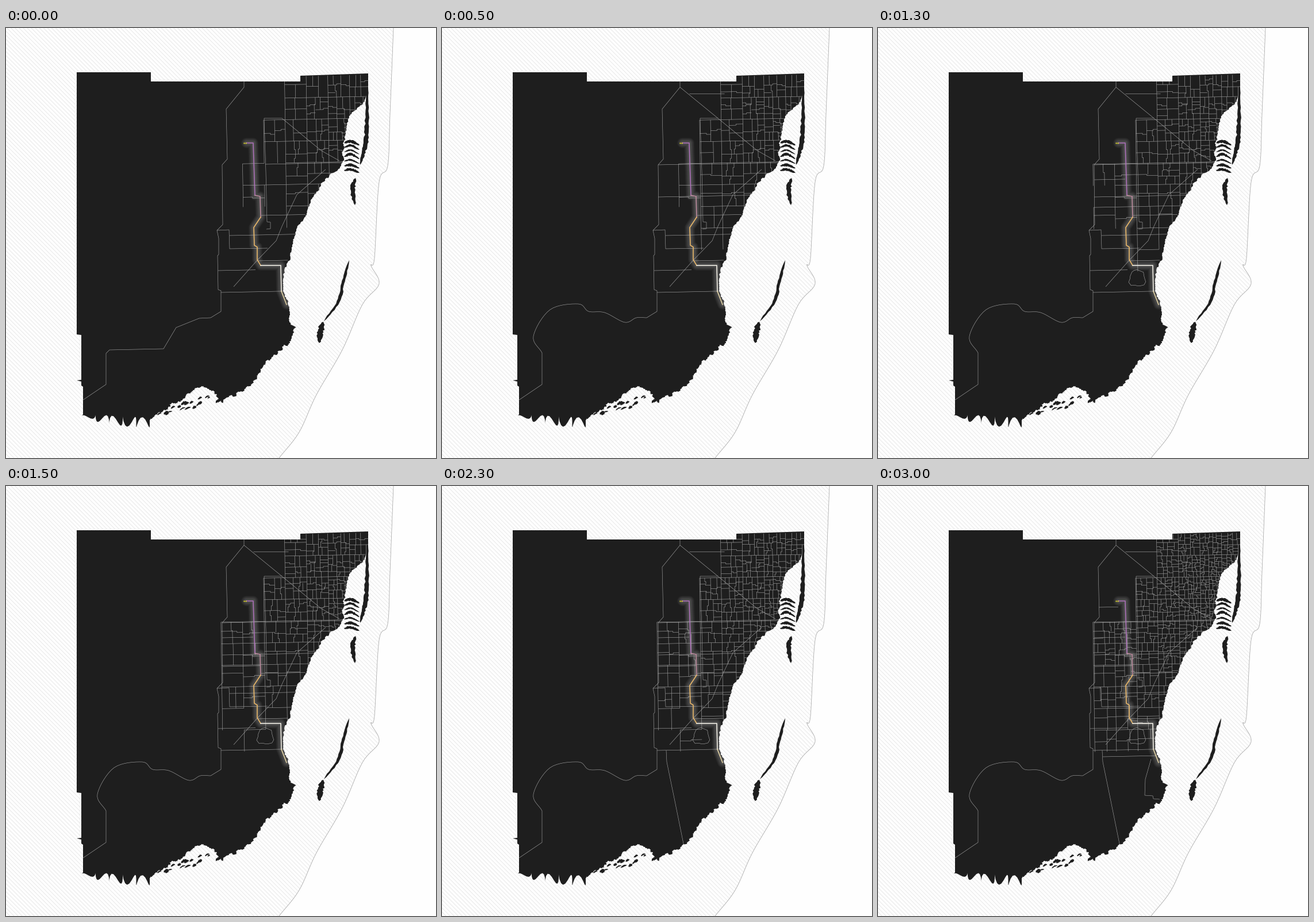
Recreate the animation shown at these times as a matplotlib script. Size 748x748 px, loop 3.5 s.

```python
import math
import random

import matplotlib.pyplot as plt
import numpy as np
from matplotlib.animation import FuncAnimation
from matplotlib.collections import LineCollection
from matplotlib.patches import Polygon

SIZE = 748
STEPS = 7
LAND, PAPER = "#1e1e1e", "#fefefe"
PX = 0.72  # points per pixel at 100 dpi
TILE = 37.6
CENTRE = (590, 170)  # the densest part of the network

rng = random.Random(12)

fig = plt.figure(figsize=(SIZE / 100, SIZE / 100), dpi=100, facecolor=PAPER)
ax = fig.add_axes([0, 0, 1, 1])
ax.set_xlim(0, SIZE)
ax.set_ylim(SIZE, 0)
ax.axis("off")


def pts(*xy):
    return np.array(xy, float).reshape(-1, 2)


def smooth(points, per=8):
    """Catmull-Rom curve through the points."""
    p = np.vstack([2 * points[0] - points[1], points, 2 * points[-1] - points[-2]])
    t = np.linspace(0, 1, per, endpoint=False)[:, None]
    out = []
    for a, b, c, d in zip(p, p[1:], p[2:], p[3:]):
        out.append(0.5 * (2 * b + (c - a) * t + (2 * a - 5 * b + 4 * c - d) * t**2
                          + (3 * b - a - 3 * c + d) * t**3))
    return np.vstack(out + [points[-1:]])


def rough(points, amp, depth=3):
    """Midpoint displacement, for ragged shores."""
    line = [tuple(p) for p in points]
    for _ in range(depth):
        out = line[:1]
        for (x0, y0), (x1, y1) in zip(line, line[1:]):
            k = rng.uniform(-amp, amp)
            out += [((x0 + x1) / 2 - k * (y1 - y0), (y0 + y1) / 2 + k * (x1 - x0)),
                    (x1, y1)]
        line = out
    return np.array(line)


def fill(points, color=LAND, z=3):
    return ax.add_patch(Polygon(points, closed=True, fc=color, ec="none", zorder=z))


def island(spine, width):
    """A ragged strip along a spine, pointed at both ends."""
    mid = smooth(spine)
    normal = np.gradient(mid, axis=0)[:, ::-1] * (-1, 1)
    normal /= np.linalg.norm(normal, axis=1)[:, None]
    n = len(mid)
    taper = np.sin(np.linspace(0, math.pi, n)) ** 0.5 * width / 2
    left, right = ([taper[i] * rng.uniform(0.6, 1.2) for i in range(n)] for _ in "lr")
    fill(np.vstack([mid + normal * np.array(left)[:, None],
                    (mid - normal * np.array(right)[:, None])[::-1]]))


# Hatched surroundings and the offshore limit
limit = smooth(pts(674, 0, 668, 150, 664, 240, 649, 268, 641, 400, 635, 413, 649, 445,
                   620, 481, 585, 560, 540, 638, 510, 703, 475, 748))
zone = fill(np.vstack([pts(0, 0), limit, pts(0, SIZE)]), PAPER, 0)
hatch = LineCollection([[(x, 0), (x + SIZE, SIZE)]
                        for x in np.arange(-SIZE, SIZE, 5 * math.sqrt(2))],
                       colors="#e9e9e9", linewidths=PX, zorder=1)
ax.add_collection(hatch)
hatch.set_clip_path(zone)
ax.plot(*limit.T, color="#a8a8a8", lw=0.8 * PX, zorder=2)

# Mainland
north = pts(134, 672, 134, 624, 131, 622, 131, 534, 123, 533, 123, 77, 252, 77,
            252, 93, 512, 93, 512, 83, 630, 79, 630, 112)
east = pts(627, 117, 621, 130, 600, 150, 592, 174, 587, 205, 583, 240, 556, 262, 542, 284,
           530, 300, 521, 328, 506, 348, 497, 385, 485, 425, 482, 452, 493, 490, 493, 512,
           505, 521)
south = pts(505, 521, 487, 553, 452, 583, 440, 601, 424, 623, 382, 643, 376, 652, 356, 630,
            332, 626, 304, 648, 268, 669, 250, 682)
t = np.linspace(0, 1, 60)
mangrove = np.column_stack([250 - 116 * t + 4 * np.sin(31 * t),
                            686 - 12 * t**2 + 9 * np.sin(44 * t) * (1 - t**4)])
mainland = fill(np.vstack([north, rough(smooth(east, 4), 0.25), rough(smooth(south, 4), 0.4),
                           mangrove]))

# Keys, bay islets and the broken southern fringe
island(pts(629, 100, 628, 150, 627, 190, 622, 216, 616, 238), 8)
island(pts(608, 261, 603, 280, 607, 308), 9)
island(pts(597, 404, 587, 440, 578, 476, 553, 510), 6)
island(pts(552, 511, 547, 528, 545, 548), 11)
for y in range(200, 252, 8):
    island(pts(588, y, 600, y - rng.uniform(0, 5), 615, y + 4), rng.uniform(2, 6))
for i in range(26):
    x = rng.uniform(250, 385)
    y = 672 - (x - 250) * 0.25 + rng.uniform(-5, 10)
    reach = rng.uniform(4, 12)
    island(pts(x, y, x + reach / 2, y - reach * 0.4, x + reach, y - reach * 0.5),
           rng.uniform(2, 6))
spit = fill(pts(123, 613, 131, 612, 131, 615))

# Each line of the network has a first and a last step
network = []


def road(first, *xy, last=STEPS - 1):
    network.append((first, last, pts(*xy)))


# Western boundary and main roads
road(0, 414, 93, 414, 103, 383, 141, 385, 228, 376, 238, 377, 342, 367, 352, 370, 366,
     370, 394, 368, 396, 369, 455, 374, 457, 374, 493)
road(0, 367, 352, 388, 351, 389, 384, 455, 383)
road(0, 396, 450, 437, 404, 470, 370, 480, 345, 506, 290, 556, 246)
road(0, 449, 157, 480, 157, 548, 213, 580, 231)
road(0, 449, 157, 452, 250, 454, 337, 460, 338, 460, 349, 453, 350)
road(1, 414, 103, 480, 157)
road(1, 430, 114, 491, 114)
road(4, 390, 460, 391, 480, 405, 548, 421, 627)
road(6, 475, 475, 465, 510, 464, 538, 478, 539, 479, 544, 490, 545)
for first, x0, x1, y in ((0, 389, 503, 361), (0, 369, 434, 422), (0, 374, 482, 460),
                         (0, 437, 490, 405), (0, 451, 582, 237), (0, 444, 521, 326),
                         (1, 376, 451, 238), (1, 376, 540, 294), (2, 376, 430, 264),
                         (3, 377, 442, 314), (5, 384, 418, 211), (6, 391, 485, 471)):
    road(first, x0, y, x1, y - 0.02 * (x1 - x0))

# Southern parkland border, rerouted after the first step
road(0, 374, 493, 356, 504, 336, 505, 296, 521, 274, 558, 180, 560, 174, 566,
     174, 620, 134, 647, last=0)
bend = smooth(pts(356, 504, 338, 504, 318, 512, 283, 495, 255, 493, 237, 480, 188, 490,
                  159, 536, 174, 565))
road(1, 374, 493, *bend.ravel(), 174, 620, 134, 647)

# A closed, stepped loop
angles = np.linspace(0, 2 * math.pi, 17)
loop = [(451 + rng.uniform(11, 17) * math.cos(a), 436 + rng.uniform(11, 17) * math.sin(a))
        for a in angles[:-1]]
road(2, *np.ravel(loop + loop[:1]))


def first_step(x, y, area):
    """Step at which a block of this area is cut; later away from the centre."""
    d = math.dist((x, y), CENTRE)
    start, end = 180 * math.exp(d / 90), 55 * math.exp(d / 130)
    area *= rng.uniform(0.6, 1.5)
    return next((s for s in range(STEPS)
                 if area > start * (end / start) ** (s / (STEPS - 1))), STEPS)


def street(first, *xy):
    """A local line, on the slightly turned street grid."""
    p = pts(*xy)
    dx, dy = (p - (500, 240)).T
    road(first, *(p + np.column_stack([0.015 * dy, -0.02 * dx])).ravel())


def divide(x0, y0, x1, y1, after=0):
    w, h = x1 - x0, y1 - y0
    step = max(after, first_step((x0 + x1) / 2, (y0 + y1) / 2, w * h))
    if step >= STEPS or min(w, h) < 4:
        return
    k, bend_at = rng.uniform(0.36, 0.64), rng.uniform(0.3, 0.7)
    jog = rng.choice([0, 0, 0, 2, -2])
    if w * rng.uniform(0.8, 1.25) > h:
        m, b = x0 + w * k, y0 + h * bend_at
        street(step, m, y0, m, b, m + jog, b, m + jog, y1)
        halves = (x0, y0, m, y1), (m, y0, x1, y1)
    else:
        m, b = y0 + h * k, x0 + w * bend_at
        street(step, x0, m, b, m, b, m + jog, x1, m + jog)
        halves = (x0, y0, x1, m), (x0, m, x1, y1)
    for half in halves:
        divide(*half, step)


for row in range(10):
    west = 3 if row < 2 else 2 if row < 4 else 0
    for col in range(west, 7):
        x, y = 374 + col * TILE, 84 + row * TILE
        step = first_step(x, y, TILE**2)
        if row:
            street(step, x, y, x + TILE, y)
        street(step, x, y, x, y + TILE)
        divide(x, y, x + TILE, y + TILE, step)

lines = LineCollection([], colors="#a6a6a6", linewidths=0.6 * PX, zorder=5)
ax.add_collection(lines)
lines.set_clip_path(mainland)

# Glowing route
route = pts(418, 200, 430, 200, 433, 291, 442, 293, 443, 329, 431, 347, 432, 378,
            437, 381, 437, 403, 443, 413, 478, 413, 479, 458, 488, 481)
for width in range(2, 20, 2):
    ax.plot(*route.T, color="white", alpha=0.03, lw=width * PX, zorder=6,
            solid_capstyle="round", solid_joinstyle="round")
for a, b, color in ((0, 2, "#b070bd"), (2, 4, "#bf8b9f"), (4, 9, "#f3bd68"),
                    (9, 11, "#fbf8ee"), (11, 12, "#ead9a8")):
    ax.plot(*route[a:b + 1].T, color=color, lw=1.5 * PX, zorder=7)
ax.plot([414, 417.5], [199.5, 199.5], "o", ms=2.2 * PX, mfc="#e8e020", mec="none", zorder=8)


def update(step):
    lines.set_segments([p for first, last, p in network if first <= step <= last])
    spit.set_visible(step < 5)
    return lines, spit


anim = FuncAnimation(fig, update, frames=STEPS, interval=500, repeat=True, blit=False)
plt.show()
```
